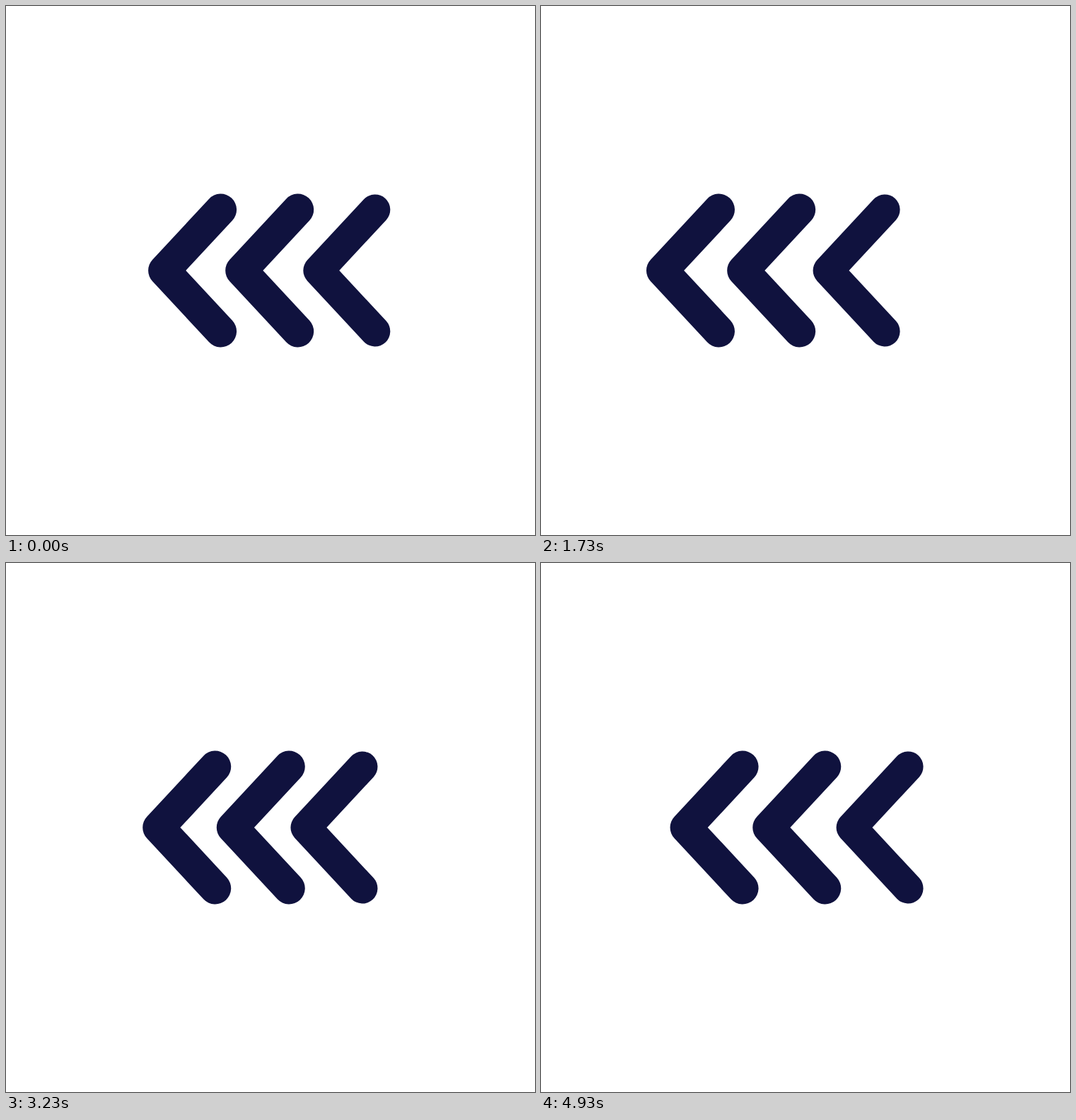
Write an HTML page that moves like this. It is 748 by 748 pixels and loops after 5010 ms.

```html
<!DOCTYPE html>
<html lang="en">
<head>
<meta charset="utf-8">
<title>Sliding chevrons</title>
<style>
  html, body { margin: 0; width: 100%; height: 100%; overflow: hidden; background: #fff; }
  svg { display: block; width: 100vw; height: 100vh; }
  path { fill: none; stroke: #10123e; stroke-linecap: round; stroke-linejoin: round; }
</style>
</head>
<body>
<svg id="stage" viewBox="0 0 748 748"></svg>
<script>
const LOOP = 5010, TRAVEL = 61, OUT = 16;
const svg = document.getElementById('stage');

// x: resting tip, w: stroke width; out/back: start ticks, dur: length of the way back
const chevrons = [
  { x: 223.6, w: 45, out: 3, back: 17.5, dur: 17 },
  { x: 332.7, w: 45, out: 2, back: 16.7, dur: 16 },
  { x: 441.8, w: 43, out: 1, back: 15.25, dur: 15 }
];

for (const c of chevrons) {
  c.el = document.createElementNS('http://www.w3.org/2000/svg', 'path');
  c.el.setAttribute('d', 'M80 -86 L0 0 L80 86');
  c.el.setAttribute('stroke-width', c.w);
  svg.appendChild(c.el);
}

// cubic-bezier(.42, 0, .58, 1)
function ease(t) {
  if (t <= 0) return 0;
  if (t >= 1) return 1;
  let lo = 0, hi = 1;
  for (let i = 0; i < 24; i++) {
    const s = (lo + hi) / 2, r = 1 - s;
    const x = 1.26 * s * r * r + 1.74 * s * s * r + s * s * s;
    if (x < t) lo = s; else hi = s;
  }
  return lo * lo * (3 - 2 * lo);
}

// Two pictures per 100 ms, each taken from a 30-tick cycle that lasts one second
function tickAt(ms) {
  const t = ms % LOOP;
  const step = Math.min(99, 2 * Math.floor(t / 100) + (t % 100 >= 30 ? 1 : 0));
  return Math.floor(1.5 * (step % 20));
}

function draw(ms) {
  const m = tickAt(ms);
  for (const c of chevrons) {
    const shift = ease((m - c.out) / OUT) - ease((m - c.back) / c.dur);
    c.el.setAttribute('transform', `translate(${(c.x - TRAVEL * shift).toFixed(2)} 374)`);
  }
}

let start = null;
function tick(now) {
  if (start === null) start = now;
  draw(Math.max(0, now - start));
  requestAnimationFrame(tick);
}
draw(0);
requestAnimationFrame(tick);
</script>
</body>
</html>
```
